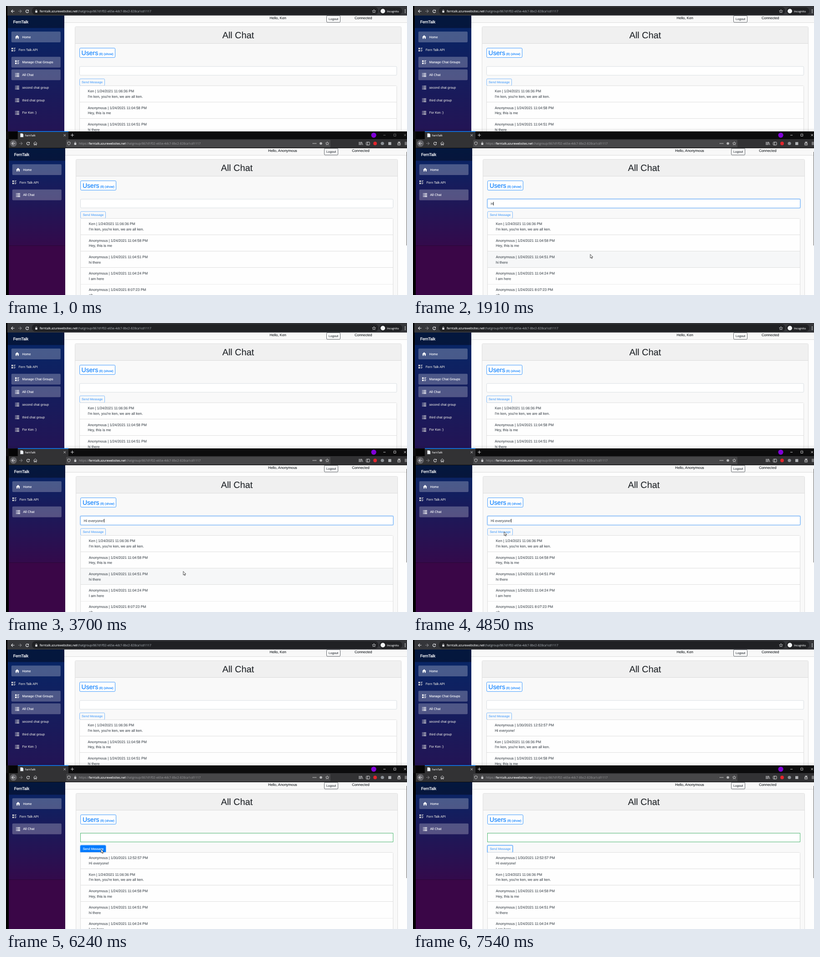
Recreate the animation shown at these times as an HTML page. Size 880 px wide and 636 px high, loop 8 s.

```html
<!DOCTYPE html>
<html lang="en">
<head>
<meta charset="utf-8">
<title>Group chat</title>
<style>
html, body { margin: 0; width: 100%; height: 100%; overflow: hidden; background: #000; }
svg { display: block; width: 880px; height: 636px; }
text { font-family: "Liberation Sans", Arial, sans-serif; text-rendering: geometricPrecision; white-space: pre; stroke-width: .12px; }
.brand text { stroke-width: .3px; }
.ui text { font-family: "Open Sans", "Noto Sans", sans-serif; }
</style>
</head>
<body>
<svg id="stage" viewBox="0 0 880 636"></svg>
<script>
const LOOP = 8000, CLICK = 980, BLUR = 4990, PRESS = 6010, SEND = 6240, ARRIVE = 6320;
const MESSAGE = 'Hi everyone!';
const KEYS = [1910, 2060, 2140, 2290, 2460, 2610, 2690, 2840, 3010, 3160, 3240, 3620];
const FEED = [
  ['Anonymous | 1/30/2021 12:52:57 PM', MESSAGE],
  ['Ken | 1/24/2021 11:06:36 PM', "I'm ken, you're ken, we are all ken."],
  ['Anonymous | 1/24/2021 11:04:58 PM', 'Hey, this is me'],
  ['Anonymous | 1/24/2021 11:04:51 PM', 'hi there'],
  ['Anonymous | 1/24/2021 11:04:24 PM', 'I am here'],
  ['Anonymous | 1/24/2021 8:07:23 PM', 'oh']
];
// time, x, y of the pointer tip
const PATH = [
  [210, 768, 614], [400, 420, 430], [520, 215, 372], [600, 206, 395], [750, 342.5, 438.5],
  [1050, 342.5, 438.5], [1280, 389, 546.5], [4080, 389, 546.5], [4400, 230, 475],
  [4620, 195, 459], [4770, 195, 459], [BLUR, 208.7, 460.5], [7080, 208.7, 460.5], [7540, 874, 252]
];
const HOST = 'ferntalk.azurewebsites.net';
const ROUTE = '/chatgroup/867d1f02-e65e-4dc7-8bc2-828ca1cd1117';
const ROW = 36.15, LIST_TOP = 175.5;

const rect = (x, y, w, h, fill, more = '') =>
  `<rect x="${x}" y="${y}" width="${w}" height="${h}" fill="${fill}" ${more}/>`;
const frame = (x, y, w, h, stroke, fill = 'none', r = 2, more = '') =>
  rect(x, y, w, h, fill, `rx="${r}" stroke="${stroke}" ${more}`);
const text = (x, y, size, fill, s, more = '') =>
  `<text x="${x}" y="${y}" font-size="${size}" fill="${fill}" stroke="${fill}" ${more}>${s}</text>`;
const path = (d, stroke, w = 1, fill = 'none', more = '') =>
  `<path d="${d}" fill="${fill}" stroke="${stroke}" stroke-width="${w}" ${more}/>`;
const dot = (x, y, r, fill) => `<circle cx="${x}" cy="${y}" r="${r}" fill="${fill}"/>`;
const at = (x, y, s) => `<g transform="translate(${x} ${y})">${s}</g>`;

const icons = {
  home: c => path('M0 .3 4.5-4 9 .3H7.8V4H5.6V1.3H3.4V4H1.2V.3Z', 'none', 0, c),
  rich: c => rect(0, -4, 3.4, 3.2, c) + rect(0, .8, 3.4, 3.2, c) +
    path('M4.8-3.4H9M4.8-1.4H8M4.8 1.4H9M4.8 3.4H8', c),
  list: c => path('M0-3H1.4M0-.5H1.4M0 2H1.4M0 4H1.4M2.5-3H9M2.5-.5H9M2.5 2H9M2.5 4H9', c, 1.2),
  back: c => path('M3.5 0H-3.5M0-3.3-3.4 0 0 3.3', c, 1.1),
  forward: c => path('M-3.5 0H3.5M0-3.3 3.4 0 0 3.3', c, 1.1),
  reload: c => path('M2.6-1.7A3.1 3.1 0 1 0 3.1.8', c, 1.2) + path('M3.5-3.6V-.4H.4Z', 'none', 0, c),
  lock: c => rect(-2.2, -.7, 4.4, 3.6, c, 'rx=".5"') + path('M-1.3-.6V-1.8A1.3 1.3 0 0 1 1.3-1.8V-.6', c, .9),
  star: c => path('M0-3.7 1.1-1.2 3.7-1 1.7.8 2.3 3.4 0 2-2.3 3.4-1.7.8-3.7-1-1.1-1.2Z', c, .8),
  cross: c => path('M-2.2-2.2 2.2 2.2M2.2-2.2-2.2 2.2', c, .9),
  burger: c => path('M-3-2.5H4M-3 0H4M-3 2.5H4', c, 1)
};
const icon = (name, x, y, c) => at(x, y, icons[name](c));

function sidebar(items) {
  let s = rect(4, 21, 124, 27.5, '#000', 'opacity=".4"') +
    `<g class="brand">${text(15.7, 37.7, 8.7, '#fff', 'FernTalk')}</g>`;
  items.forEach(([glyph, label, on, outdent = 0], i) => {
    const y = 68.2 + i * 27.75, c = on ? '#fff' : '#d7d7d7';
    if (on) s += rect(11.8, y - 11.9, 108, 23.8, '#fff', 'rx="2" opacity=".25"');
    s += icon(glyph, 20 - outdent, y, c) + text(35.5 - outdent, y + 2.6, 7.11, c, label);
  });
  return s;
}

function chat(id, user, w, right, rows, nudge) {
  const T = (x, ...rest) => text(x + nudge, ...rest);
  const lw = w - 20, [hello, logout, status] = right;
  const thin = 'stroke-width=".75"';
  const input = (stroke, fill, r) => frame(161.5, 133.1, lw, 19.2, stroke, fill, r, thin);
  const button = fill => frame(161.6, 160.3, 54.9, 15, '#007bff', fill, 2, thin);
  let s = rect(128, 21, 760, 620, '#fefefe') + rect(128, 21, 760, 15.5, '#f8f8f8') +
    rect(128, 36, 760, 1, '#dcdcdc') +
    text(hello, 29.3, 7.9, '#212529', 'Hello, ' + user) +
    frame(logout, 21.3, 30, 14.6, '#343a40', '#fbfbfb', 2, thin) +
    text(logout + 4.5, 31.3, 6.92, '#343a40', 'Logout') +
    text(status, 29.3, 7.95, '#212529', 'Connected') +
    frame(151.5, 45.5, w, 700, '#dfdfdf', '#f9f9f9') +
    rect(152, 46, w - 1, 36, '#f0f0f0') + rect(152, 82, w - 1, 1, '#dcdcdc') +
    text(151.5 + w / 2, 71, 19.9, '#212529', 'All Chat', 'text-anchor="middle"') +
    frame(161.7, 92.7, 77.8, 20.6, '#007bff', '#fefefe', 2, thin) +
    T(165.6, 107.6, 14, '#007bff', 'Users') + T(204.3, 107.6, 6.95, '#007bff', '(8) (show)') +
    input('#ced4da', '#fff', 2) +
    `<g id="${id}Focus" opacity="0">` +
      frame(160.7, 132.4, lw + 1.6, 20.6, '#007bff', 'none', 2.5, 'stroke-width="1.6" opacity=".3"') +
      input('#80bdff', 'none', 2) + '</g>' +
    `<g id="${id}Valid" opacity="0">${input('#26b050', 'none', 0)}</g>` +
    T(168.2, 145.7, 7.95, '#495057', '', `id="${id}Typed"`) +
    rect(168.2, 139, .9, 8, '#222', `id="${id}Caret" opacity="0"`) +
    `<g id="${id}Ring" opacity="0">` +
      frame(160.9, 159.6, 56.3, 16.4, '#007bff', 'none', 2.5, 'stroke-width="1.5" opacity=".4"') + '</g>' +
    `<g id="${id}Send" opacity=".65">` + button('#f9f9f9') +
      T(166, 170.3, 6.92, '#007bff', 'Send Message') + '</g>' +
    `<g id="${id}Hot" opacity="0">` + button('#007bff') +
      T(166, 170.3, 6.92, '#fff', 'Send Message') + '</g>' +
    frame(161.5, LIST_TOP, lw, 500, '#dfdfdf', '#fefefe');
  for (let i = 0; i < rows; i++) {
    const y = LIST_TOP + i * ROW;
    s += rect(162, y + .5, lw - 1, ROW - 1, '#fefefe', `id="${id}Row${i}"`) +
      rect(162, Math.round(y + ROW - .5), lw - 1, 1, '#dfdfdf') +
      T(179.4, y + 14.9, 7.88, '#495057', '', `id="${id}Head${i}"`) +
      T(179.4, y + 26.8, 7.88, '#495057', '', `id="${id}Body${i}"`);
  }
  return s;
}

function topBar() {
  const c = '#e8eaed';
  return '<g class="ui">' + rect(3, 0, 877, 21, '#35363a') + rect(57, 2.5, 760, 16.5, '#202124', 'rx="8"') +
    icon('back', 15, 11.5, c) + icon('forward', 30.5, 11.5, '#85868a') + icon('reload', 46.5, 11.5, c) +
    icon('lock', 66.5, 11.5, c) + text(74, 13.8, 6.68, '#e8eaed', HOST) +
    text(154.6, 13.8, 6.68, '#9aa0a6', ROUTE) + icon('star', 807.5, 11.5, c) +
    rect(819.5, 3, 50, 16, '#202124', 'rx="8"') + dot(827, 11.2, 5, '#f1f3f4') +
    text(836, 13.6, 6, c, 'Incognito') +
    [8.5, 11.5, 14.5].map(y => dot(876, y, .9, c)).join('') + '</g>';
}

function bottomBar() {
  const c = '#d8d8da', g = '#8f8f92';
  return '<g class="ui">' + rect(0, 276, 880, 17, '#0c0c0d') + rect(7, 277, 18, 16, '#050506') +
    rect(26, 276, 111, 17, '#323234') + rect(26, 275.5, 111, 1.5, '#0a84ff') +
    path('M31.5 280.5H36L38 282.5V288.5H31.5Z', '#aaa', .5, '#eef3f8') +
    text(41.5, 287.2, 5.9, '#f0f0f2', 'FernTalk') + icon('cross', 128.7, 284.5, c) +
    path('M142 284.2H149M145.5 280.7V287.7', c, 1) + dot(807, 284.3, 5.6, '#8000d7') +
    `<g id="controls">${path('M828 284.3H833M851 281.8H855.6V286.4H851Z', '#fff', .75)}` +
      icon('cross', 875.7, 284.2, '#fff') + '</g>' +
    rect(6, 293, 874, 19, '#323234') + rect(6, 312, 874, 1, '#0c0c0d') +
    rect(132, 294.5, 580, 16.5, '#474749', 'rx="1.5"') +
    dot(16.3, 302.5, 7.4, '#626266') + icon('back', 16.3, 302.5, c) + icon('forward', 32.5, 302.5, '#77777a') +
    icon('reload', 48.5, 302.5, c) + path('M60.5 302.3 64.3 298.8 68.2 302.3M61.7 302V306H63.4V303.5H65.3V306H67V302', c, 1) +
    path('M138 299 141 300V302.5Q140.6 305 138 306 135.4 305 135 302.5V300Z', c, .9) +
    icon('lock', 152, 302.5, c) + text(160, 305, 6.6, g, 'https://') + text(182, 305, 6.55, '#f9f9fa', HOST) +
    text(261, 305, 6.75, g, ROUTE) + [674, 677, 680].map(x => dot(x, 302.5, .9, c)).join('') +
    dot(691, 302.5, 2.8, '#b8b8ba') + icon('star', 705, 302.5, c) +
    path('M775 299V306M777.2 299V306M779.4 299V306M780.6 299.2 783 306', c, 1) +
    frame(790.5, 299.5, 7.5, 6.5, c, 'none', 1) + path('M793.5 299.5V306', c, 1) +
    dot(810, 302.5, 3.9, '#e3262d') + dot(826, 302.5, 3.6, '#8d9196') + rect(839, 299.5, 6.4, 6.4, '#b0b2b5') +
    path('M859 301.5H866M859.5 302V306H865.5V302M862.5 301V306M862.5 301Q859.5 299 861 298.5 862.5 299 862.5 301 863 298.5 864.5 298.5 865.5 300 862.5 301', c, .9) +
    icon('burger', 878, 302.5, c) + '</g>';
}

const gradient = (id, end) =>
  `<linearGradient id="${id}" gradientUnits="userSpaceOnUse" x1="0" y1="21" x2="0" y2="${end}">` +
  '<stop stop-color="#052767"/><stop offset="1" stop-color="#3a0647"/></linearGradient>';

const stage = document.getElementById('stage');
stage.innerHTML =
  `<defs>${gradient('skyA', 470)}${gradient('skyB', 268)}` +
  '<linearGradient id="fade" x2="0" y2="1"><stop stop-opacity="0"/><stop offset="1"/></linearGradient></defs>' +
  rect(0, 0, 880, 636, '#000') + rect(4, 21, 124, 260, 'url(#skyA)') +
  sidebar([['home', 'Home', 1], ['rich', 'Fern Talk API', 0, 8], ['rich', 'Manage Chat Groups', 1],
    ['list', 'All Chat', 1], ['list', 'second chat group', 0], ['list', 'third chat group', 0], ['list', 'For Ken :)', 0]]) +
  chat('a', 'Ken', 716, [578.5, 703.5, 765], 3, 0) + topBar() +
  rect(3, 268, 877, 8, 'url(#fade)', 'id="shade"') + rect(0, 276, 880, 360, '#000') +
  at(2, 292, rect(4, 21, 124, 214.5, 'url(#skyB)') + rect(4, 235.5, 124, 120, '#3a0647') +
    sidebar([['home', 'Home', 1], ['rich', 'Fern Talk API', 0, 8], ['list', 'All Chat', 1]]) +
    chat('b', 'Anonymous', 706, [573.2, 696.5, 757.2], 5, .4)) +
  bottomBar() + rect(879, 321, 1, 206, '#606060', 'id="thumb"') +
  '<g id="pointer">' +
    `<g id="arrow">${path('M0 0V8.2L1.9 6.5 3.2 9.4 4.5 8.8 3.2 6H5.8Z', '#222', .8, '#fff')}</g>` +
    `<g id="beam">${path('M-1.7-4H1.7M-1.7 4H1.7M0-4V4', '#333', .8)}</g>` +
    `<g id="hand">${path('M0 .8Q.9-.4 1.7.8V4L4.8 4.6Q5.6 5 5.4 6.3L4.7 10H.4L-2.3 6.4Q-1.8 5.2 0 6.5Z', '#222', .8, '#fff')}</g></g>`;

const el = {};
stage.querySelectorAll('[id]').forEach(n => { el[n.id] = n; });
const fadeTo = (id, v) => el[id].setAttribute('opacity', v);
const ramp = (t, start) => Math.min(1, Math.max(0, (t - start) / 150));
const write = (id, s) => { if (el[id].textContent !== s) el[id].textContent = s; };

function fill(id, rows, first) {
  for (let i = 0; i < rows; i++) {
    write(`${id}Head${i}`, FEED[i + first][0]);
    write(`${id}Body${i}`, FEED[i + first][1]);
  }
}

function pointerAt(t) {
  const i = PATH.findIndex(p => p[0] > t);
  if (i < 1) return null;
  const [t0, x0, y0] = PATH[i - 1], [t1, x1, y1] = PATH[i], k = (t - t0) / (t1 - t0);
  return [x0 + (x1 - x0) * k, y0 + (y1 - y0) * k];
}

function draw(t) {
  const ready = t >= BLUR && t < SEND, sent = t >= SEND, p = pointerAt(t);
  const typed = sent ? '' : MESSAGE.slice(0, KEYS.filter(k => k <= t).length);

  fadeTo('controls', t < CLICK ? .5 : 1);
  fadeTo('shade', t < CLICK ? .03 : .08);
  fadeTo('bFocus', ramp(t, CLICK) - ramp(t, BLUR));
  fadeTo('bValid', t >= BLUR ? 1 : 0);
  fadeTo('bSend', ready ? 1 : .65);
  fadeTo('bHot', ramp(t, BLUR) - ramp(t, SEND));
  fadeTo('bRing', ramp(t, PRESS));

  write('bTyped', typed);
  const reset = [1000, ...KEYS, 3700].filter(k => k <= t).pop();
  const lit = t >= 1000 && t < BLUR && Math.floor((t - reset) / 530) % 2 === 0;
  el.bCaret.setAttribute('x', 168.2 + (typed ? el.bTyped.getComputedTextLength() + .3 : 0));
  fadeTo('bCaret', lit ? 1 : 0);

  fill('a', 3, t >= ARRIVE ? 0 : 1);
  fill('b', 5, sent ? 0 : 1);
  el.thumb.setAttribute('height', sent ? 203 : 206);

  const inside = (x, y, w, h) => p && p[0] >= x && p[0] <= x + w && p[1] >= y && p[1] <= y + h;
  const beam = inside(163.5, 425, 686, 19.5), hand = ready && inside(163.5, 452, 56, 15);
  for (let i = 0; i < 5; i++) {
    const over = inside(164, 292 + LIST_TOP + i * ROW, 685, ROW - .1);
    el['bRow' + i].setAttribute('fill', over ? '#f6f7f8' : '#fefefe');
  }
  fadeTo('pointer', p ? 1 : 0);
  fadeTo('beam', beam ? 1 : 0);
  fadeTo('hand', hand ? 1 : 0);
  fadeTo('arrow', beam || hand ? 0 : 1);
  if (p) el.pointer.setAttribute('transform', `translate(${p[0]} ${p[1]})`);
}

const began = performance.now();
function tick() {
  draw((performance.now() - began) % LOOP);
  requestAnimationFrame(tick);
}
tick();
</script>
</body>
</html>
```
